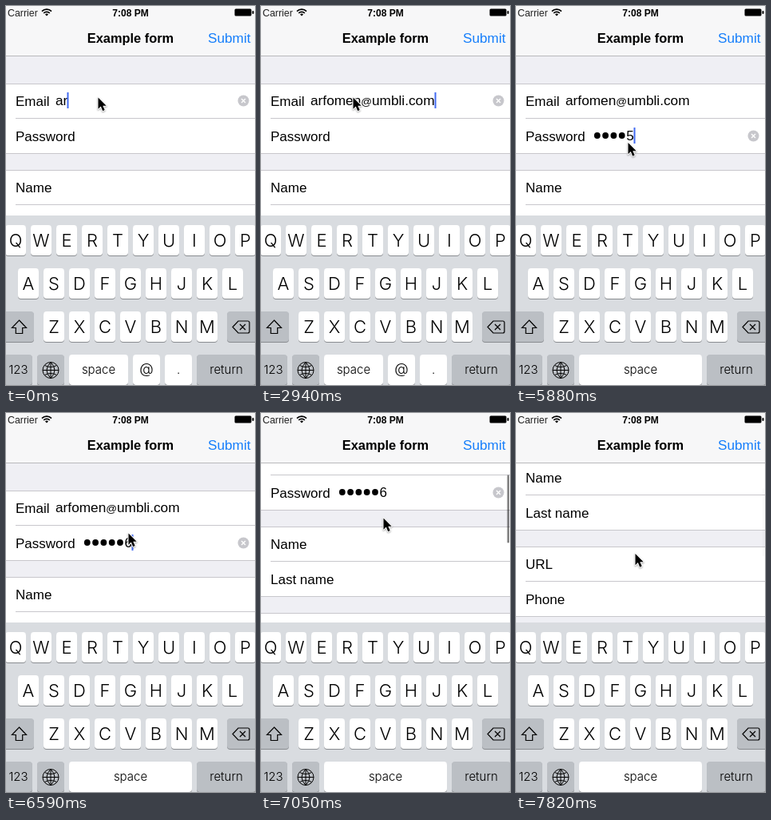
Animation of 312x474 px, one loop 8000 ms. Source, as an HTML page with a canvas:

```html
<!DOCTYPE html>
<html lang="en">
<head>
<meta charset="utf-8">
<title>Example form</title>
<style>
html, body { margin: 0; width: 100%; height: 100%; overflow: hidden; background: #efeff4; }
canvas { display: block; }
</style>
</head>
<body>
<canvas id="stage" width="312" height="474"></canvas>
<script>
const ctx = document.getElementById('stage').getContext('2d');
const SANS = '"Liberation Sans", Arial, sans-serif';
const LIGHT = 'Inter, "Liberation Sans", sans-serif';
const LOOP = 8000, FOCUS_PASSWORD = 4030, SCROLL_START = 6600;

// "<" is a backspace
const EMAIL_KEYS = 'arfomn<en@umbli.com';
const EMAIL_TIMES = [0, 0, 120, 170, 410, 590, 1060, 1150, 1240, 1650,
  1890, 1940, 2120, 2240, 2420, 2590, 2680, 2760, 2940];
const PASSWORD_TIMES = [4740, 5040, 5280, 5580, 5880, 6120];

// [time, value, ...]
const SCROLL = [[SCROLL_START, 0], [6820, 26], [6870, 31], [7050, 63], [7165, 63],
  [7175, 82], [7300, 104], [7450, 124], [7600, 139], [7700, 146]];
const POINTER = [[0, 115, 114.5], [3530, 115, 114.5], [3950, 140, 171], [6120, 140, 171],
  [6500, 153, 158], [6820, 153, 131.5], [7400, 153, 131.5], [7820, 149, 176]];
const BAR_ALPHA = [[SCROLL_START, 0], [6680, 0.5], [7480, 0.5], [7820, 0.02]];

const GROUPS = [
  [97, 'Email', 'Password'],
  [205, 'Name', 'Last name'],
  [313, 'URL', 'Phone']
];

function track(keys, t, i = 1) {
  const n = keys.findIndex(k => k[0] > t);
  if (n === 0) return keys[0][i];
  if (n < 0) return keys[keys.length - 1][i];
  const a = keys[n - 1], b = keys[n];
  return a[i] + (b[i] - a[i]) * (t - a[0]) / (b[0] - a[0]);
}

function rect(x, y, w, h, color) {
  ctx.fillStyle = color;
  ctx.fillRect(x, y, w, h);
}

function round(x, y, w, h, r, color) {
  ctx.fillStyle = color;
  ctx.beginPath();
  ctx.roundRect(x, y, w, h, r);
  ctx.fill();
}

function text(str, x, y, font, color = '#000', align = 'left') {
  ctx.font = font;
  ctx.fillStyle = color;
  ctx.textAlign = align;
  ctx.fillText(str, x, y);
  return x + ctx.measureText(str).width;
}

function stroke(d, width, color = '#000') {
  ctx.lineWidth = width;
  ctx.strokeStyle = color;
  ctx.stroke(new Path2D(d));
}

function disc(x, y, r, color) {
  ctx.fillStyle = color;
  ctx.beginPath();
  ctx.arc(x, y, r, 0, 7);
  ctx.fill();
}

function caret(x, y) {
  rect(Math.round(x) - 0.5, y, 2, 20, '#426bf2');
}

function clearButton(y) {
  disc(297.5, y, 7, '#c7c7cc');
  stroke(`M295 ${y - 2.5}l5 5m0 -5l-5 5`, 1.4, '#fff');
}

function emailText(t) {
  let str = '';
  EMAIL_TIMES.forEach((at, i) => {
    if (t >= at) str = EMAIL_KEYS[i] === '<' ? str.slice(0, -1) : str + EMAIL_KEYS[i];
  });
  return str;
}

function drawEmail(t) {
  let x = 62;
  for (const part of emailText(t).split(/(@)/))
    x = text(part, x, 124, `${part === '@' ? 13.5 : 17.25}px ${SANS}`);
  if (t < FOCUS_PASSWORD) {
    caret(x, 108);
    clearButton(118.5);
  }
}

function drawPassword(t) {
  if (t < FOCUS_PASSWORD) return;
  const count = PASSWORD_TIMES.filter(at => t >= at).length;
  let x = 97;
  for (let i = 1; i < count; i++, x += 10.3) disc(x + 4.8, 162, 3.9, '#000');
  if (count) {
    x = text(count, x, 168, `17px ${SANS}`);
    clearButton(162.5);
  }
  if (t < SCROLL_START) caret(x, 152);
}

function drawForm(t, scroll) {
  const line = '#c8c7cc';
  rect(0, 0, 312, 474, '#efeff4');
  ctx.save();
  ctx.translate(0, -Math.round(scroll));
  for (const [top, first, second] of GROUPS) {
    rect(0, top, 312, 88, '#fff');
    rect(0, top, 312, 1, line);
    rect(12, top + 43, 300, 1, line);
    rect(0, top + 87, 312, 1, line);
    text(first, 12, top + 28, `17px ${SANS}`);
    text(second, 12, top + 72, `17px ${SANS}`);
  }
  drawEmail(t);
  drawPassword(t);
  ctx.restore();
}

function drawHeader() {
  rect(0, 0, 312, 62, '#f7f7f8');
  rect(0, 62, 312, 1, '#b9b9bc');
  text('Carrier', 2, 13, `12.4px ${SANS}`, '#222');
  text('7:08 PM', 156, 13, `bold 12px ${SANS}`, '#000', 'center');
  text('Example form', 156, 46, `bold 16.4px ${SANS}`, '#000', 'center');
  text('Submit', 253, 46, `17.2px ${SANS}`, '#157efb');
  // signal and battery
  stroke('M45 6.6a8.5 8.5 0 0 1 12 0M47.2 9a5.4 5.4 0 0 1 7.6 0', 1.7);
  ctx.fillStyle = '#000';
  ctx.fill(new Path2D('M51 12.6l-2 -2.2a2.8 2.8 0 0 1 4 0z'));
  round(286.5, 3.5, 21, 9, 1.5, '#000');
  round(308.5, 6, 2, 4, 1, '#000');
}

function key(x, y, w, label = '', gray = false, size = 15) {
  round(x, y + 1, w, 38, 4, '#898c90');
  round(x, y, w, 38, 4, gray ? '#bbbfc4' : '#fff');
  text(label, x + w / 2, y + (size > 20 ? 27 : 24), `300 ${size}px ${LIGHT}`, '#000', 'center');
}

function drawKeyboard(t) {
  rect(0, 262, 312, 212, '#d9dce0');
  [['QWERTYUIOP', -1, 274], ['ASDFGHJKL', 15, 328], ['ZXCVBNM', 47, 382]].forEach(
    ([row, x, y]) => [...row].forEach((c, i) => key(x + i * 32, y, 26, c, false, 22)));
  key(-5, 382, 40, '', true);
  key(277, 382, 40, '', true);
  key(-2, 436, 35, '123', true);
  key(39, 436, 34, '', true);
  if (t < FOCUS_PASSWORD) {
    key(79, 436, 74, 'space');
    key(159, 436, 34, '@', false, 18);
    key(199, 436, 34, '.');
  } else {
    key(79, 436, 154, 'space');
  }
  key(239, 436, 74, 'return', true);
  // shift, backspace, globe
  stroke('M16.5 393l9 9.5h-4.8v7h-8.4v-7h-4.8z', 1.2);
  stroke('M284 401.5l7 -7.5h12q2 0 2 2v11q0 2 -2 2h-12zM293 398l7 7m0 -7l-7 7', 1.2);
  stroke('M46 455.5a10 10 0 1 1 20 0a10 10 0 1 1 -20 0zh20M56 445.5v20' +
    'M56 445.5q-10 10 0 20q10 -10 0 -20M48.5 449.5q7.5 4 15 0M48.5 461.5q7.5 -4 15 0', 1);
}

function drawPointer(x, y) {
  const arrow = new Path2D('M0 0v14.2l3.3 -3.1l2.4 5.6l2.5 -1.1l-2.4 -5.4h4.4z');
  ctx.save();
  ctx.translate(x + 0.5, y);
  ctx.lineJoin = 'round';
  ctx.lineWidth = 2;
  ctx.strokeStyle = '#fff';
  ctx.shadowColor = 'rgba(0,0,0,.35)';
  ctx.shadowBlur = 2;
  ctx.shadowOffsetY = 1;
  ctx.stroke(arrow);
  ctx.shadowColor = 'transparent';
  ctx.fillStyle = '#000';
  ctx.fill(arrow);
  ctx.restore();
}

function draw(now) {
  const t = now % LOOP;
  const scroll = track(SCROLL, t);
  drawForm(t, scroll);
  drawHeader();
  drawKeyboard(t);
  round(308.5, 65 + scroll * 0.2, 2.5, 85, 1.25, `rgba(0,0,0,${track(BAR_ALPHA, t)})`);
  drawPointer(track(POINTER, t), track(POINTER, t, 2));
  requestAnimationFrame(() => draw(performance.now() - start));
}

const start = performance.now();
draw(0);
</script>
</body>
</html>
```
